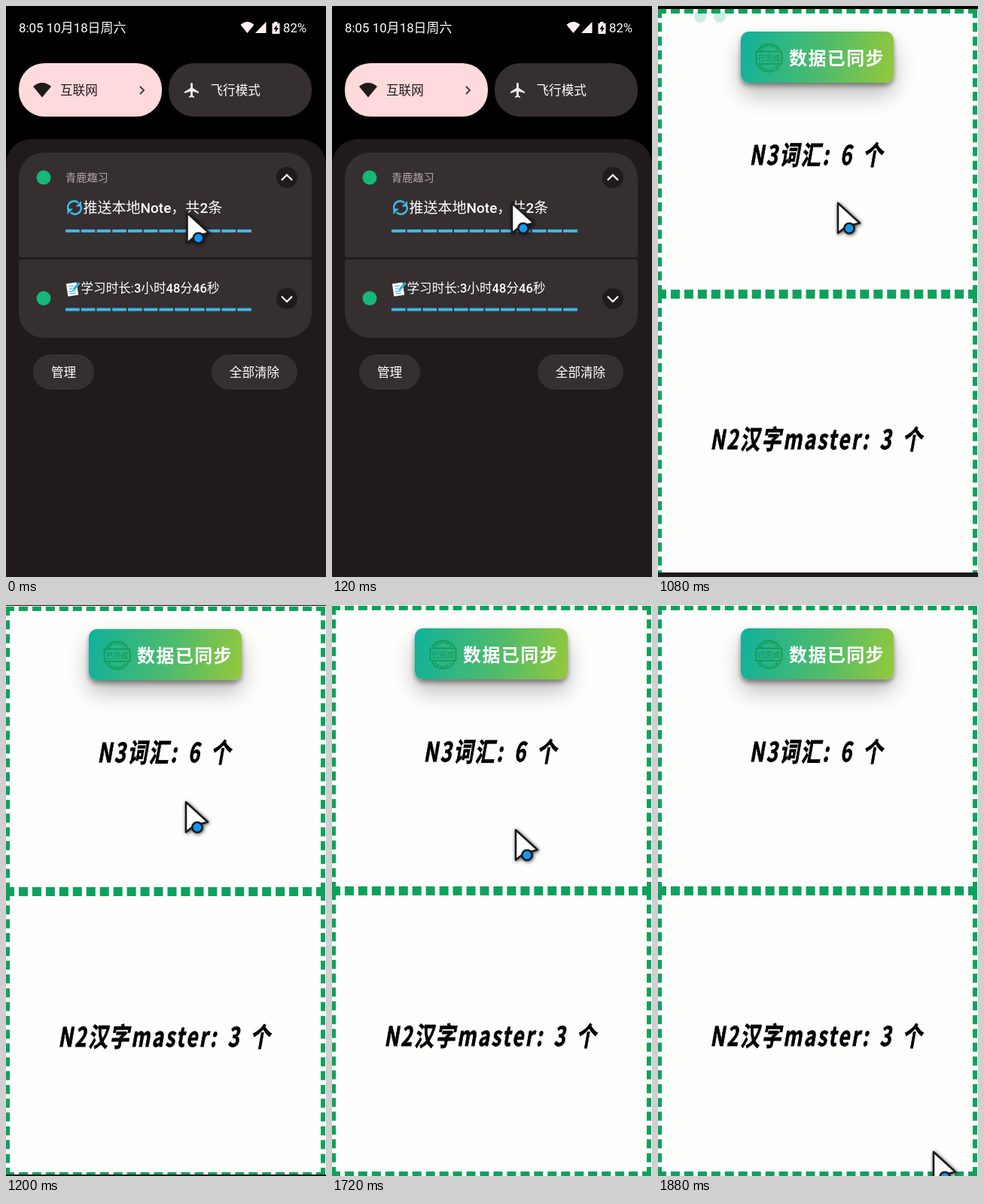
An HTML page that plays this animation: 425 px wide and 759 px high, repeating every 2.04 s.

```html
<!DOCTYPE html>
<html lang="zh-CN">
<head>
<meta charset="utf-8">
<style>
html, body { margin: 0; width: 100%; height: 100%; overflow: hidden; background: #000; }
svg, #sync { position: absolute; left: 0; top: 0; width: 425px; height: 759px; overflow: hidden; }
text { font-family: Roboto, "Noto Sans CJK SC", "Noto Sans CJK", sans-serif; font-size: 16.6px; fill: #fff; }
.mid { text-anchor: middle; }
.line { fill: none; stroke: #fff; stroke-width: 2.2; }
.bar { stroke: #3fb6e4; stroke-width: 4; stroke-dasharray: 18.7 2.05; }
#sync { background: #fefefd; }
#page { position: absolute; width: 425px; height: 759px; }
.box { position: absolute; left: -1px; width: 425px; box-sizing: border-box; border: 6px dashed #0ca25d; }
#upper { top: 1px; height: 379px; }
#lower { top: 380px; height: 379px; }
.banner { position: absolute; left: 110px; top: 30.5px; width: 203px; height: 68px; border-radius: 11px;
  background: linear-gradient(100deg, #10b19c, #4fbb6b 55%, #94c93b);
  box-shadow: 0 4px 6px #0006, 0 16px 30px #0004; }
.big text { font: 900 26px "Noto Sans CJK SC", "Noto Sans CJK", sans-serif; letter-spacing: 2.5px; word-spacing: 4px;
  fill: #000; stroke: #000; stroke-width: .6; text-anchor: middle; }
</style>
</head>
<body>
<svg viewBox="0 0 425 759">
  <defs>
    <path id="sheet" d="M13 191a33 33 0 0 1 33-33H377a33 33 0 0 1 33 33V411a3 3 0 0 1-3 3H16a3 3 0 0 1-3-3Z"/>
  </defs>
  <rect width="425" height="759"/>
  <text x="17" y="35" style="font-size:16.9px">8:05 10月18日周六</text>
  <g fill="#ffeff0">
    <path d="M311.500 25Q320.500 17 329.500 25L320.500 36ZM331 36H345.500V21Z"/>
    <path d="M356 21h4.500v2h3v14h-10v-14h2.500z"/>
  </g>
  <path d="M359.500 25l-4 6h2.500v4l4-6h-2.500z"/>
  <text x="368" y="35" style="font-size:16.8px">82%</text>

  <rect x="17" y="76" width="190" height="71" rx="34" fill="#ffdadc"/>
  <rect x="216" y="76" width="190" height="71" rx="34" fill="#352f30"/>
  <path d="M36 107Q48 97 60 107L48 121.500Z" fill="#201a1b"/>
  <text x="72" y="118" style="fill:#201a1b">互联网</text>
  <path class="line" d="M178 107l5 5-5 5" style="stroke:#4b3d3f;stroke-width:2"/>
  <path transform="translate(235 100)" fill="#f3e9ea" d="M21 16v-2l-8-5V3.500c0-.8-.7-1.500-1.500-1.500S10 2.700 10 3.500V9l-8 5v2l8-2.500V19l-2 1.500V22l3.500-1 3.500 1v-1.500L13 19v-5.500z"/>
  <text x="271.500" y="118">飞行模式</text>

  <path fill="#201a1b" d="M0 211a34 34 0 0 1 34-34H391a34 34 0 0 1 34 34V759H0Z"/>
  <g fill="#352f30">
    <path d="M17 228a33 33 0 0 1 33-33H373a33 33 0 0 1 33 33V331a3 3 0 0 1-3 3H20a3 3 0 0 1-3-3Z"/>
    <path d="M20 337H403a3 3 0 0 1 3 3V408a33 33 0 0 1-33 33H50a33 33 0 0 1-33-33V340a3 3 0 0 1 3-3Z"/>
    <rect x="36" y="463" width="81" height="47" rx="23.500"/>
    <rect x="273" y="463" width="114" height="47" rx="23.500"/>
  </g>
  <text class="mid" x="76.500" y="493">管理</text>
  <text class="mid" x="330" y="493">全部清除</text>

  <g id="note">
    <circle cx="50" cy="228" r="9.500" fill="#15b878"/>
    <text x="79" y="233" style="font-size:14.2px;fill:#b5a6a7">青鹿趣习</text>
    <circle cx="373" cy="228" r="14" fill="#201a1b"/>
    <path class="line" d="M366 231.500l7-7 7 7"/>
    <g fill="none" stroke="#40bbea" stroke-width="2.600">
      <path d="M83 271A8.200 8.200 0 0 1 96 261.500M99 265A8.200 8.200 0 0 1 86 274.500"/>
      <path fill="#40bbea" stroke="none" d="M100 259v7.500h-7.500zM81.500 277v-7.500h7.500z"/>
    </g>
    <text x="102.500" y="274.500" style="font-size:19px">推送本地<tspan font-weight="500">Note</tspan>，共<tspan font-weight="500">2</tspan>条</text>
    <path class="bar" d="M79 299H326.500"/>
  </g>

  <circle cx="50" cy="388.500" r="9.500" fill="#15b878"/>
  <g transform="rotate(-8 89 376)">
    <rect x="81" y="368" width="14" height="17" fill="#fff"/>
    <path d="M83.500 372h7M83.500 375.500h5M83.500 379h8M83.500 382h8" stroke="#53b9e4" stroke-width="1.300"/>
    <path d="M88 379l1.500-4 8-7 2.200 2.400-8 7z" fill="#35ace0"/>
  </g>
  <text x="99.500" y="381">学习时长:<tspan font-weight="500">3</tspan>小时<tspan font-weight="500">48</tspan>分<tspan font-weight="500">46</tspan>秒</text>
  <path class="bar" d="M79 403.500H326.500"/>
  <circle cx="373" cy="389" r="14" fill="#201a1b"/>
  <path class="line" d="M366 386l7 7 7-7"/>

  <g id="lift">
    <use href="#sheet" fill="#352f30"/>
    <use href="#note" y="-37"/>
    <use href="#sheet" fill="#fff" opacity=".79"/>
  </g>
</svg>

<div id="sync">
  <svg id="ghost" fill="#15b878" opacity=".22"><circle cx="56" cy="14" r="8"/><circle cx="82" cy="14" r="8"/></svg>
  <div id="page">
    <div class="box" id="upper"></div>
    <div class="box" id="lower"></div>
    <div class="banner"></div>
    <svg viewBox="0 0 425 759">
      <g fill="none" stroke="#12954a" stroke-width="1.500">
        <path d="M132.500 56.500a17 17 0 0 1 30 0M132.500 75.500a17 17 0 0 0 30 0"/>
        <path d="M136 56.500a13.500 13.500 0 0 1 23 0M136 75.500a13.500 13.500 0 0 0 23 0" stroke-dasharray="3 1.500"/>
        <rect x="130.500" y="57.500" width="34" height="16.500" rx="1"/>
      </g>
      <text class="mid" x="147.500" y="69.500" style="font-size:10px;font-weight:500;fill:#12954a">已完成</text>
      <text x="174" y="75" style="font-size:24px;font-weight:700;letter-spacing:1.4px">数据已同步</text>
      <g class="big">
        <text transform="translate(211 207.500) skewX(-10) scale(1 1.36)">N3词汇: 6 个</text>
        <text transform="translate(211 586) skewX(-10) scale(1 1.36)">N2汉字master: 3 个</text>
      </g>
    </svg>
  </div>
</div>

<svg viewBox="0 0 425 759">
  <g id="cursor" style="filter:drop-shadow(1px 1.5px 2.5px #000b)" stroke="#1b1b1d" stroke-width="2.600" stroke-linejoin="round">
    <path fill="#fff" d="M1 1V41L12 32 30 27.500Z"/>
    <circle cx="16" cy="34.500" r="6.700" fill="#1297f5"/>
  </g>
</svg>

<script>
const $ = id => document.getElementById(id);
const LOOP = 2040;
// start time, cursor x, cursor y
const pointer = [[0, 239.5, 274], [120, 238, 261], [1720, 243, 298], [1880, 365, 726]];
// start time, page shift, clipped top, clipped bottom
const opening = [[1080, 3, 4, 6], [1200, 1, 1, 2], [1320, 0, 0, 0]];
const at = (steps, t) => steps.filter(s => s[0] <= t).pop();
const show = (id, on) => $(id).style.display = on ? '' : 'none';

function draw(now) {
  const t = now % LOOP;
  const [, x, y] = at(pointer, t);
  $('cursor').setAttribute('transform', `translate(${x} ${y})`);
  show('lift', t >= 960 && t < 1080);
  show('ghost', t < 1200);
  const step = at(opening, t);
  show('sync', step);
  if (step) {
    const [, shift, top, bottom] = step;
    $('page').style.top = shift + 'px';
    $('sync').style.clipPath = `inset(${top}px 0 ${bottom}px)`;
  }
  requestAnimationFrame(() => draw(performance.now()));
}
draw(0);
</script>
</body>
</html>
```
